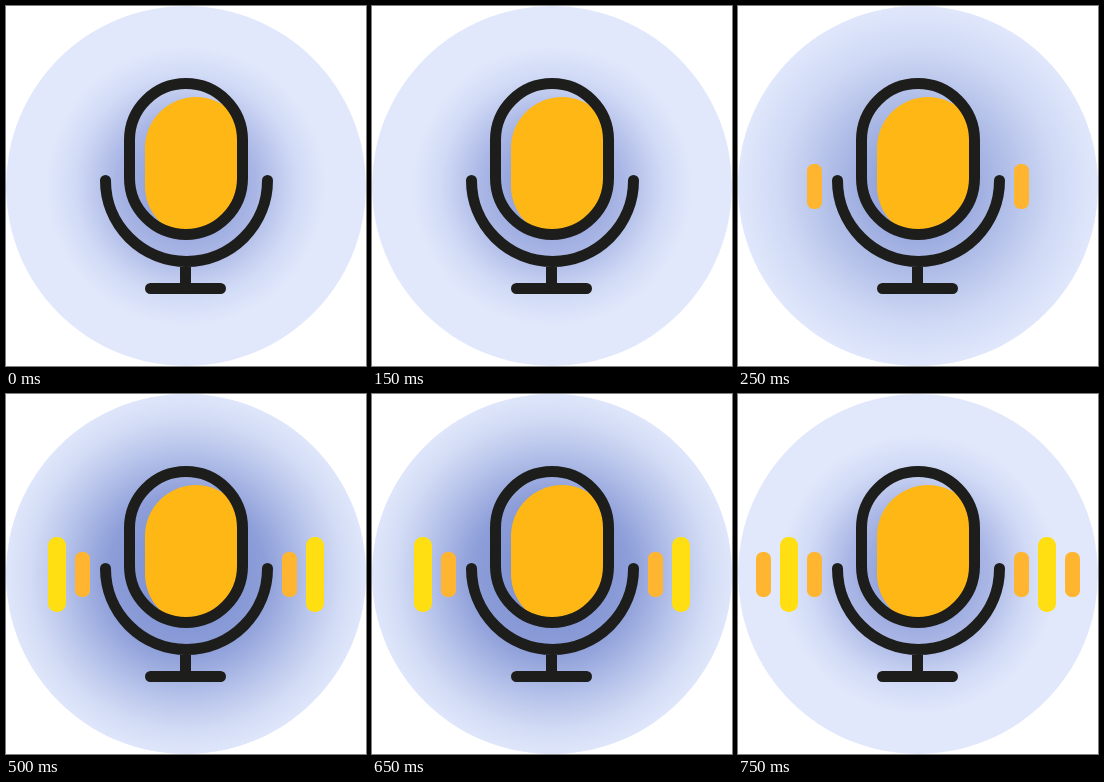
Write an HTML page without scripts that moves like this. It is 360 px wide and 360 px high and loops after 1000 ms.

```html
<!DOCTYPE html>
<html lang="en">
<head>
<meta charset="utf-8">
<title>Microphone</title>
<style>
  html, body { margin: 0; width: 100%; height: 100%; overflow: hidden; background: #fff; }
  svg { display: block; width: 100vw; height: 100vh; }
  .mid, .wide, .near, .tall, .far { animation: 1s step-end infinite; }
  .mid { animation-name: second; }
  .wide { animation-name: third; }
  .near { animation-name: from-second; }
  .tall { animation-name: from-third; }
  .far { animation-name: fourth; }
  .near, .far { fill: #ffb52f; }
  .tall { fill: #ffde12; }
  @keyframes second { 0%, 50% { opacity: 0; } 25% { opacity: 1; } 100% { opacity: 0; } }
  @keyframes third { 0%, 75% { opacity: 0; } 50% { opacity: 1; } 100% { opacity: 0; } }
  @keyframes from-second { 0% { opacity: 0; } 25%, 100% { opacity: 1; } }
  @keyframes from-third { 0% { opacity: 0; } 50%, 100% { opacity: 1; } }
  @keyframes fourth { 0% { opacity: 0; } 75%, 100% { opacity: 1; } }
</style>
</head>
<body>
<svg viewBox="0 0 360 360">
  <defs>
    <radialGradient id="glow-small" gradientUnits="userSpaceOnUse" cx="180" cy="180" r="140">
      <stop offset="0" stop-color="#7b8ed2"/>
      <stop offset=".5" stop-color="#a9b6e5"/>
      <stop offset=".8" stop-color="#d2dbf6"/>
      <stop offset="1" stop-color="#e1e8fc"/>
    </radialGradient>
    <radialGradient id="glow-mid" gradientUnits="userSpaceOnUse" cx="180" cy="180" r="182">
      <stop offset="0" stop-color="#7d90d4"/>
      <stop offset=".5" stop-color="#b2bfe8"/>
      <stop offset=".75" stop-color="#cfd9f5"/>
      <stop offset="1" stop-color="#e1e8fc"/>
    </radialGradient>
    <radialGradient id="glow-wide" gradientUnits="userSpaceOnUse" cx="180" cy="180" r="184">
      <stop offset="0" stop-color="#7589cd"/>
      <stop offset=".43" stop-color="#8d9ed9"/>
      <stop offset=".7" stop-color="#bbc7ec"/>
      <stop offset=".85" stop-color="#d3dcf5"/>
      <stop offset="1" stop-color="#e1e8fc"/>
    </radialGradient>
    <clipPath id="capsule">
      <rect x="126" y="80" width="108" height="146" rx="54"/>
    </clipPath>
  </defs>

  <circle cx="180" cy="180" r="180" fill="url(#glow-small)"/>
  <circle class="mid" cx="180" cy="180" r="180" fill="url(#glow-mid)"/>
  <circle class="wide" cx="180" cy="180" r="180" fill="url(#glow-wide)"/>

  <g class="near">
    <rect x="69" y="158" width="15" height="45" rx="6.5"/>
    <rect x="276" y="158" width="15" height="45" rx="6.5"/>
  </g>
  <g class="tall">
    <rect x="42" y="143" width="18" height="75" rx="8.5"/>
    <rect x="300" y="143" width="18" height="75" rx="8.5"/>
  </g>
  <g class="far">
    <rect x="18" y="158" width="15" height="45" rx="6.5"/>
    <rect x="327" y="158" width="15" height="45" rx="6.5"/>
  </g>

  <rect x="139" y="91" width="102" height="140" rx="51" fill="#ffb715" clip-path="url(#capsule)"/>
  <g fill="none" stroke="#1d1d1b" stroke-width="11" stroke-linecap="round">
    <rect x="123.5" y="77.5" width="113" height="151" rx="56.5"/>
    <path d="M99.5 174.5a81 81 0 0 0 162 0M179.5 256V282M144.5 282.5H214.5"/>
  </g>
</svg>
</body>
</html>
```
